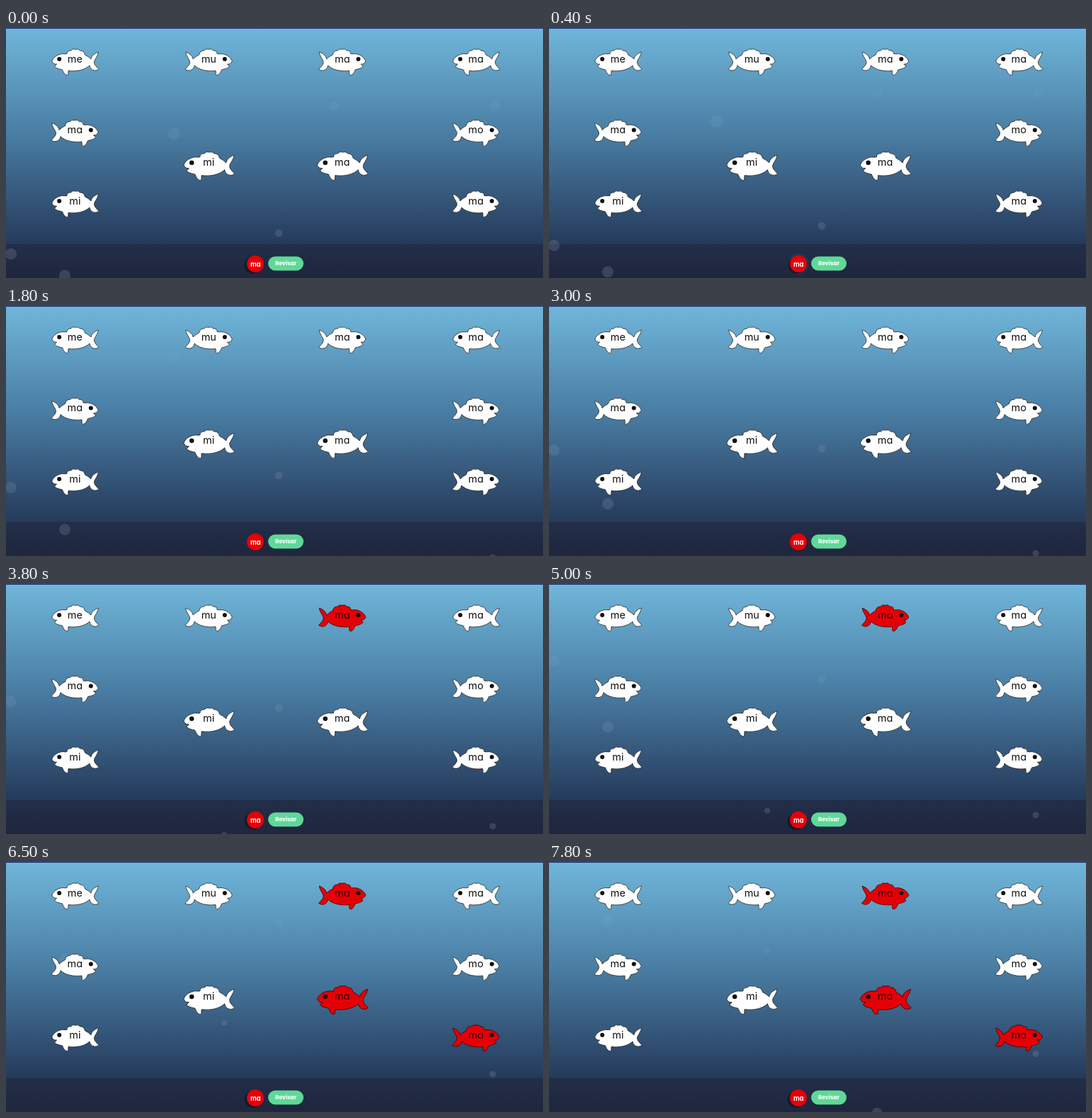
An HTML page with a canvas for the animation above (8 s loop, 758 px wide and 354 px high).

```html
<!DOCTYPE html>
<html lang="es">
<head>
<meta charset="utf-8">
<title>Peces</title>
<style>
  html, body { margin: 0; width: 758px; height: 354px; overflow: hidden; background: #253a5b; }
  canvas, svg { position: absolute; left: 0; top: 0; }
  text { font-family: Inter, "Open Sans", sans-serif; font-feature-settings: "cv11"; text-anchor: middle; }
  .syllable { font-size: 14.5px; fill: #111; }
  .token { font-size: 9.5px; font-weight: 700; fill: #fff; }
  .check { font-size: 8px; font-weight: 800; fill: #fff; }
</style>
</head>
<body>
<canvas width="758" height="354"></canvas>
<svg width="758" height="354"></svg>
<script>
const W = 758, H = 354, LOOP = 8000;
const RED = '#e60005';
const ctx = document.querySelector('canvas').getContext('2d');
const svg = document.querySelector('svg');

const body = new Path2D(
  'M.8 19 C3 12.5 10 9 16 8.5 Q19 9 22 8.5 Q22 3.5 27.5 4 Q30 .5 34 2.2 Q38 .8 40.5 4 ' +
  'Q46 3.5 47.5 10 Q52 12 56 16 C57 11 61 8 66.3 6 C65.5 13 60 17 60.5 21 ' +
  'C61 25 64 26.5 67 30.5 C62 34 55 32 54 25 C48 31 37 34 24 32.5 ' +
  'C23.5 35 24.5 38 22.5 39 C18 38 17 34 15.5 31 C11 30 6 29 4.5 26 Q6.5 25 7.5 23 Q3 24 .8 19 Z');

const fish = [
  { x: 64, y: 28, word: 'me' },
  { x: 253, y: 28, word: 'mu', right: true },
  { x: 441.5, y: 28, word: 'ma', right: true, redAt: 3700 },
  { x: 630, y: 28, word: 'ma' },
  { x: 64, y: 128.5, word: 'ma', right: true },
  { x: 630, y: 128.5, word: 'mo', right: true },
  { x: 250, y: 173.5, word: 'mi', scale: 1.085 },
  { x: 438.5, y: 173.5, word: 'ma', scale: 1.085, redAt: 5300 },
  { x: 64, y: 229, word: 'mi' },
  { x: 630, y: 229, word: 'ma', right: true, redAt: 6500 }
];

// start: seconds; rate: radians per second of the ease-in-out rise
const bubbles = [
  { x: 7, r: 8, start: -2.6, rate: .238 },
  { x: 83, r: 8, start: -1.18, rate: .217 },
  { x: 385, r: 5.5, start: -5, rate: .168 },
  { x: 237, r: 9, start: -7.3, rate: .22 },
  { x: 463, r: 7, start: -8.2, rate: .22 },
  { x: 690, r: 7, start: -8.2, rate: .22 },
  { x: 687, r: 4.5, start: 1.22, rate: .146 },
  { x: 308, r: 4, start: 3.48, rate: .4 },
  { x: 463, r: 7, start: 7.1, rate: .22 }
];

function addText(content, x, y, className) {
  const el = document.createElementNS('http://www.w3.org/2000/svg', 'text');
  el.setAttribute('x', x);
  el.setAttribute('y', y);
  el.setAttribute('class', className);
  el.textContent = content;
  svg.append(el);
  return el;
}

for (const f of fish) {
  const s = f.scale || 1;
  f.label = addText(f.word, f.x + 33.3 * s, f.y + (s > 1 ? 21.7 : 20.7), 'syllable');
}
addText('ma', 352.3, 337.5, 'token');
addText('Revisar', 395, 336.3, 'check');

function gradient(y0, y1, ...colors) {
  const g = ctx.createLinearGradient(0, y0, 0, y1);
  colors.forEach((c, i) => g.addColorStop(i / (colors.length - 1), c));
  return g;
}
const water = gradient(0, 306, '#70b6da', '#497ca2', '#253a5b');
const seabed = gradient(306, H, '#222e49', '#1f263d');

function rect(x, y, w, h, fill) {
  ctx.fillStyle = fill;
  ctx.fillRect(x, y, w, h);
}

function circle(x, y, r, fill) {
  ctx.fillStyle = fill;
  ctx.beginPath();
  ctx.arc(x, y, r, 0, Math.PI * 2);
  ctx.fill();
}

function drawBubble({ x, r, start, rate }, t) {
  const phase = (t / 1000 - start) * rate;
  if (phase < 0 || phase > Math.PI) return;
  const rise = (1 - Math.cos(phase)) / 2;
  circle(x, 357 - 400 * rise, r, `rgba(255,255,255,${.14 * Math.max(0, 1 - 1.15 * rise)})`);
}

function drawFish(f, t) {
  const red = t >= f.redAt;
  const s = f.scale || 1;
  ctx.save();
  ctx.translate(f.x, f.y);
  ctx.scale(s, s);
  if (f.right) {
    ctx.translate(67, 0);
    ctx.scale(-1, 1);
  }
  ctx.fillStyle = red ? RED : '#fff';
  ctx.fill(body);
  ctx.strokeStyle = red ? '#300' : '#222';
  ctx.lineWidth = .8;
  ctx.stroke(body);
  circle(11.2, 16, 3, '#111');
  ctx.restore();
  f.label.style.fill = red ? '#300004' : '#111';
}

function drawToken(t) {
  const lifted = t >= 3700;
  const mix = lifted ? 0 : Math.min(t / 1800, 1);
  const glow = lifted ? 0 : Math.max(0, 1 - Math.abs(t - 1000) / 800);
  if (glow) {
    const halo = ctx.createRadialGradient(352, 334, 11, 352, 334, 16);
    halo.addColorStop(0, `rgba(90,150,190,${.7 * glow})`);
    halo.addColorStop(1, 'rgba(90,150,190,0)');
    circle(352, 334, 16, halo);
  }
  circle(348.5 + 4.5 * mix, 336 - mix, 12, '#141a2c');
  circle(352, 334, 12, RED);
}

function drawButton() {
  ctx.fillStyle = '#5fd898';
  ctx.beginPath();
  ctx.roundRect(370, 323.5, 50, 20, 10);
  ctx.fill();
}

function draw(t) {
  rect(0, 0, W, 306, water);
  rect(0, 306, W, H - 306, seabed);
  rect(0, 0, W, 1, '#1d2f78');
  rect(0, H - 1, W, 1, '#2a2148');
  bubbles.forEach(b => drawBubble(b, t));
  fish.forEach(f => drawFish(f, t));
  drawToken(t);
  drawButton();
}

const begin = performance.now();
function tick() {
  draw((performance.now() - begin) % LOOP);
  requestAnimationFrame(tick);
}
tick();
</script>
</body>
</html>
```
